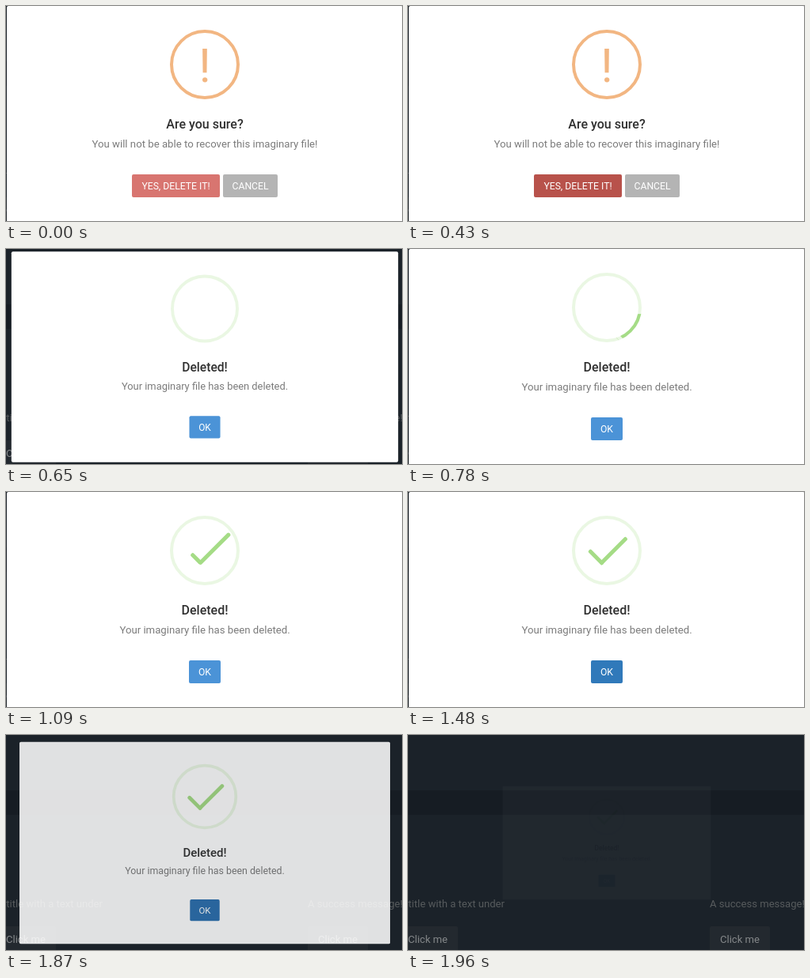
An HTML page with a canvas that plays this animation: 500x272 px, repeating every 2010 ms.

```html
<!DOCTYPE html>
<html lang="en">
<head>
<meta charset="utf-8">
<title>Confirm dialog</title>
<style>
  html, body { margin: 0; width: 100%; height: 100%; overflow: hidden; background: #1b2229; }
  canvas { position: absolute; left: 0; top: 0; width: 500px; height: 272px; display: block; }
</style>
</head>
<body>
<canvas id="page" width="500" height="272"></canvas>
<canvas id="modal" width="500" height="272"></canvas>
<script>
const LOOP = 2010;
const SHOW = 470;    // second dialog pops in
const ICON = 480;    // success icon starts
const HIDE = 1853;   // dialog shrinks away
const CX = 251, CY = 136.5, ICON_Y = 74;
const GREEN = '#a5dc86', ORANGE = '#f2b682';

const modal = document.getElementById('modal');
const page = document.getElementById('page').getContext('2d');
const ctx = modal.getContext('2d');

const clamp = v => Math.max(0, Math.min(1, v));
const lerp = (a, b, p) => a + (b - a) * p;

function bezier(x1, y1, x2, y2) {
  const at = (a, b, s) => 3 * a * s * (1 - s) ** 2 + 3 * b * s * s * (1 - s) + s ** 3;
  return x => {
    if (x <= 0) return 0;
    if (x >= 1) return 1;
    let lo = 0, hi = 1;
    for (let i = 0; i < 24; i++) {
      const mid = (lo + hi) / 2;
      if (at(x1, x2, mid) < x) lo = mid; else hi = mid;
    }
    return at(y1, y2, lo);
  };
}
const ease = bezier(0.25, 0.1, 0.25, 1);
const easeIn = bezier(0.42, 0, 1, 1);

// Keys are [position, ...values]; each segment is eased on its own.
function keyed(keys, p, curve = ease) {
  if (p <= keys[0][0]) return keys[0].slice(1);
  for (let i = 1; i < keys.length; i++) {
    const a = keys[i - 1], b = keys[i];
    if (p <= b[0]) {
      const q = curve((p - a[0]) / (b[0] - a[0]));
      return a.slice(1).map((v, k) => lerp(v, b[k + 1], q));
    }
  }
  return keys[keys.length - 1].slice(1);
}

const POP = [[0, 0.7], [0.45, 1.05], [0.8, 0.95], [1, 1]];
const SPIN = [[0.05, -45], [0.12, -405]];
// Check strokes: length, left (or right) offset, top
const TIP = [[0.54, 0, 1, 19], [0.7, 50, -8, 37], [0.84, 17, 21, 48], [1, 25, 14, 46]];
const LONG = [[0.65, 0, 46, 54], [0.84, 55, 0, 35], [1, 47, 8, 38]];
// Button colours over time
const RED = [[40, 216, 117, 112], [430, 184, 82, 75]];
const BLUE = [[SHOW, 184, 82, 75], [650, 75, 147, 215], [1180, 75, 147, 215],
              [1480, 48, 121, 186], [1700, 48, 121, 186], [1800, 44, 112, 175]];

const rgb = c => `rgb(${c.map(Math.round).join(',')})`;

function box(g, x, y, w, h, r, color) {
  g.fillStyle = color;
  g.beginPath();
  g.roundRect(x, y, w, h, r);
  g.fill();
}

function text(g, str, x, y, size, color, weight = 400, align = 'center') {
  g.font = `${weight} ${size}px Roboto, "Noto Sans", sans-serif`;
  g.textAlign = align;
  g.fillStyle = color;
  g.fillText(str, x, y);
}

function ring(color) {
  ctx.strokeStyle = color;
  ctx.lineWidth = 4;
  ctx.beginPath();
  ctx.arc(CX, ICON_Y, 42, 0, Math.PI * 2);
  ctx.stroke();
}

function turned(x, y, deg, draw) {
  ctx.save();
  ctx.translate(x, y);
  ctx.rotate(deg * Math.PI / 180);
  draw();
  ctx.restore();
}

function halfDisc(x, y, deg, left) {
  turned(x, y, deg, () => {
    ctx.fillStyle = '#fff';
    ctx.beginPath();
    ctx.arc(0, 0, 60, -Math.PI / 2, Math.PI / 2, left);
    ctx.fill();
  });
}

function bar(x, y, len, deg, color, r) {
  if (len < 0.1) return;
  turned(x, y, deg, () => box(ctx, -len / 2, -2.5, len, 5, Math.min(r, len / 2), color));
}

function button(label, x, w, color) {
  box(ctx, x, 213, w, 29, 2, color);
  text(ctx, label, x + w / 2, 232, 12.2, '#fff');
}

function labels(title, body) {
  text(ctx, title, CX, 155, 16, '#303030', 500);
  text(ctx, body, CX, 179, 13.2, '#7b7b7b');
}

function confirmDialog(t) {
  ring(ORANGE);
  text(ctx, '!', CX, 96, 60, ORANGE);
  labels('Are you sure?', 'You will not be able to recover this imaginary file!');
  button('YES, DELETE IT!', 159, 111, rgb(keyed(RED, t)));
  button('CANCEL', 274, 69, '#b4b4b4');
}

function successIcon(ms) {
  const ox = CX - 40, oy = ICON_Y - 40;
  const spin = keyed(SPIN, ms / 4250, easeIn)[0];
  // White halves hide the green ring; one of them makes a full turn.
  if (spin < -45 && spin > -405) {
    ring(GREEN);
    halfDisc(ox + 27, oy + 53, -45, true);
    halfDisc(ox + 30, oy + 49, spin, false);
    bar(ox + 30.5, oy + 53, 90, 45, '#fff', 0);
  }
  ring('rgba(165,220,134,0.23)');

  const p = ms / 750;
  const [tipLen, tipX, tipY] = keyed(TIP, p);
  const [longLen, longX, longY] = keyed(LONG, p);
  bar(ox + tipX + tipLen / 2, oy + tipY + 2.5, tipLen, 45, GREEN, 2);
  bar(ox + 80 - longX - longLen / 2, oy + longY + 2.5, longLen, -45, GREEN, 2);
}

function deletedDialog(t) {
  successIcon(t - ICON);
  labels('Deleted!', 'Your imaginary file has been deleted.');
  button('OK', 231, 40, rgb(keyed(BLUE, t)));
}

function drawPage() {
  page.fillStyle = '#1b2229';
  page.fillRect(0, 0, 500, 272);
  page.fillStyle = '#161c23';
  page.fillRect(0, 70, 500, 31);
  text(page, 'A title with a text under', 122, 218, 13.1, '#575b5d', 400, 'right');
  text(page, 'A success message!', 381, 218, 13.1, '#575b5d', 400, 'left');
  box(page, -13, 242, 76, 34, 2, '#23292f');
  box(page, 381, 242, 76, 34, 2, '#23292f');
  text(page, 'Click me', 25, 263, 13.1, '#85888a');
  text(page, 'Click me', 419, 263, 13.1, '#85888a');
}

function frame(now) {
  const t = now % LOOP;
  const out = ease(clamp((t - HIDE) / 150));
  let scale = 1;
  if (t >= SHOW) scale = keyed(POP, (t - SHOW) / 300)[0];
  scale *= lerp(1, 0.5, out);

  drawPage();
  ctx.clearRect(0, 0, 500, 272);
  ctx.save();
  ctx.translate(CX, CY);
  ctx.scale(scale, scale);
  ctx.translate(-CX, -CY);
  box(ctx, 1, 0, 500, 273, 2, '#fff');
  if (t < SHOW) confirmDialog(t); else deletedDialog(t);
  ctx.restore();
  modal.style.opacity = clamp(1 - 1.03 * out);

  requestAnimationFrame(frame);
}
frame(performance.now());
</script>
</body>
</html>
```
